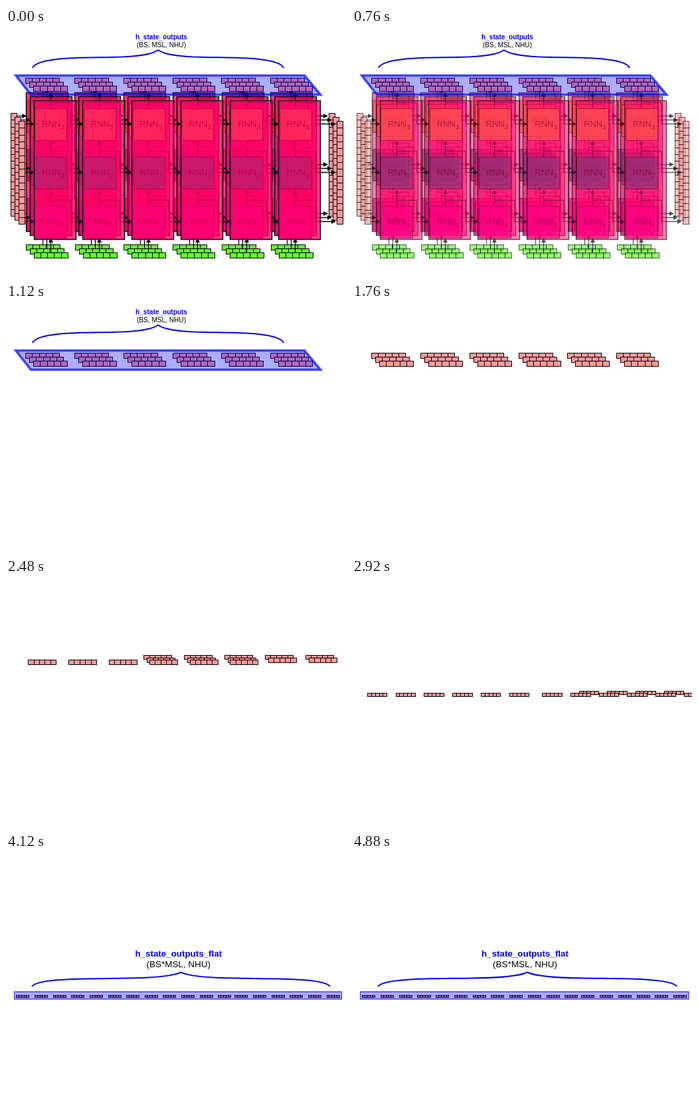
These frames come from a looping animation (512 by 372 pixels, 4.92 s). An HTML page with a canvas:

```html
<!DOCTYPE html>
<html>
<head>
<meta charset="utf-8">
<style>
html, body { margin: 0; overflow: hidden; background: #fff; }
canvas { display: block; }
</style>
</head>
<body>
<canvas id="stage" width="512" height="372"></canvas>
<script>
const ctx = document.getElementById('stage').getContext('2d');
const LOOP = 4920, TICK = 40, COLS = 6, PITCH = 73.75;
const FONT = '"Liberation Sans", Arial, sans-serif';
const PINK = '#ff9999', GREEN = '#66ff33', BLUE = '#0000f0';
const BOXES = [[121, '#ffaa33', 3], [194, '#0c6c88', 2], [268, '#ff00aa', 1]];

const snap = v => Math.round(v) + .5;
const mix = (a, b, p) => a.map((v, i) => v + (b[i] - v) * p);

function box(x, y, w, h, fill, line = 1) {
  ctx.lineWidth = line;
  ctx.strokeStyle = '#000';
  ctx.fillStyle = fill;
  const l = snap(x), t = snap(y), r = snap(x + w), b = snap(y + h);
  ctx.fillRect(l, t, r - l, b - t);
  ctx.strokeRect(l, t, r - l, b - t);
}

function cells(x, y, fill, k = 1) {
  for (let i = 0; i < 5; i++) box(x + i * 10.2 * k, y, 10.2 * k, 8.2 * k, fill);
}

function polyline(points) {
  ctx.beginPath();
  points.forEach(p => ctx.lineTo(...p));
}

// Line through the points with a head at the last one
function arrow(...points) {
  const [[px, py], [x, y]] = points.slice(-2);
  const dx = Math.sign(x - px), dy = Math.sign(y - py);
  ctx.strokeStyle = ctx.fillStyle = '#000';
  ctx.lineWidth = 1.3;
  polyline([...points.slice(0, -1), [x - 5 * dx, y - 5 * dy]]);
  ctx.stroke();
  const bx = x - 7 * dx, by = y - 7 * dy;
  polyline([[x, y], [bx + 3.5 * dy, by + 3.5 * dx], [bx - 3.5 * dy, by - 3.5 * dx]]);
  ctx.fill();
}

function text(str, x, y, size, color, weight = '', align = 'center') {
  ctx.font = `${weight} ${size}px ${FONT}`;
  ctx.textAlign = align;
  ctx.fillStyle = color;
  ctx.fillText(str, x, y);
}

function brace(x0, xm, x1, yEnd, yFlat, yTip) {
  const half = x => {
    const at = f => xm + (x - xm) * f;
    ctx.moveTo(x, yEnd);
    ctx.bezierCurveTo(at(.96), yFlat - 1, at(.58), yFlat + 1, at(.37), yFlat);
    ctx.bezierCurveTo(at(.21), yFlat - .5, at(.05), yFlat - 3, xm, yTip);
  };
  ctx.beginPath();
  half(x0);
  half(x1);
  ctx.strokeStyle = BLUE;
  ctx.lineWidth = 2;
  ctx.stroke();
}

function glass(points, line) {
  polyline(points);
  ctx.closePath();
  ctx.fillStyle = 'rgba(0,0,255,.32)';
  ctx.fill();
  ctx.strokeStyle = 'rgba(0,0,255,.7)';
  ctx.lineWidth = line;
  ctx.stroke();
}

function networkLayer(alpha) {
  ctx.globalAlpha = alpha;
  for (let i = 0; i < 15; i++) {
    box(19, 140 + i * 10.33, 8.5, 10.33, PINK);
    box(498, 140 + i * 10.33, 8.5, 10.33, PINK);
  }
  for (const [y] of BOXES) arrow([28, y + 23.5], [43, y + 23.5]);
  for (let c = 0; c < COLS; c++) {
    const x = 43 + c * PITCH, mid = Math.floor(x + 24) + .5;
    cells(x - 1.25, 338, GREEN);
    arrow([mid, 338], [mid, 316]);
    for (const [y, fill, n] of BOXES) {
      const row = y + 23.5, out = y - 8.5;
      box(x, y, 48, 48, fill);
      text('RNN', x + 11, y + 28, 13, '#000', '', 'left');
      text(n, x + 39.5, y + 31, 9, '#000', '', 'left');
      arrow([mid, y], [mid, n === 3 ? 96 : y - 25]);
      arrow([mid, out], [x + 54.5, out], [x + 54.5, row],
            [c === COLS - 1 ? 497 : x + PITCH, row]);
    }
  }
  for (let c = 0; c < COLS; c++) {
    ctx.globalAlpha = alpha * .78;
    box(41.5 + c * PITCH, 109, 63, 209, '#ff0066', 0.01);
    ctx.globalAlpha = alpha;
    box(41.5 + c * PITCH, 109, 63, 209, 'transparent', 1.4);
  }
}

function network(alpha) {
  for (let layer = 2; layer >= 0; layer--) {
    ctx.save();
    ctx.translate(-6 * layer, -6 * layer);
    networkLayer(alpha);
    ctx.restore();
  }
}

// Each pose is [x, y, scale] of a batch's first row
function rows(split, flatten, grow) {
  for (let b = 2; b >= 0; b--) {
    const stacked = [41.25 - 6 * b, 87 - 6 * b, 1];
    const spread = [[27, 150, .694], [345, 150, .694], [340.8, 146, .694]][b];
    const flat = [12.5 + ([15.2, 181.5, 345.3][b] - 12.5) * grow, 214, .3763 * grow];
    const [x, y, k] = mix(mix(stacked, spread, split), flat, flatten);
    for (let c = 0; c < COLS; c++) cells(x + c * PITCH * k, y, PINK, k);
  }
}

function stackedLabel(alpha) {
  ctx.globalAlpha = alpha;
  glass([[14.8, 71.5], [449.5, 71.5], [473.5, 100.5], [37.5, 100.5]], 3.6);
  brace(40, 229, 418, 60, 44, 33);
  text('h_state_outputs', 234, 17, 10.1, BLUE, 'bold');
  text('(BS, MSL, NHU)', 234, 29, 10.1, '#000');
}

function flatLabel(alpha, grow) {
  ctx.save();
  ctx.globalAlpha = alpha;
  ctx.translate(12.5, 215);
  ctx.scale(grow, grow);
  ctx.translate(-12.5, -215);
  glass([[12.5, 209], [507, 209], [507, 220], [12.5, 220]], 1.3);
  brace(39, 264, 489.5, 201, 188.5, 179.5);
  text('h_state_outputs_flat', 260.5, 156, 13.4, BLUE, 'bold');
  text('(BS*MSL, NHU)', 260.5, 172, 13.5, '#000');
  ctx.restore();
}

function draw(now) {
  const t = now % LOOP;
  const progress = (start, steps) =>
    Math.min(Math.max(Math.floor((t - start) / TICK) + 1, 0), steps) / steps;
  const netAlpha = 1 - progress(600, 14), labelAlpha = 1 - progress(1160, 16);
  const flatAlpha = progress(3320, 14), grow = .9936 + .0064 * progress(3320, 40);

  ctx.globalAlpha = 1;
  ctx.clearRect(0, 0, 512, 372);
  if (netAlpha) network(netAlpha);
  ctx.globalAlpha = 1;
  rows(progress(2200, 14), progress(2760, 14), grow);
  if (labelAlpha) stackedLabel(labelAlpha);
  if (flatAlpha) flatLabel(flatAlpha, grow);
}

let start;
function tick(now) {
  start ??= now;
  draw(now - start);
  requestAnimationFrame(tick);
}
requestAnimationFrame(tick);
</script>
</body>
</html>
```
